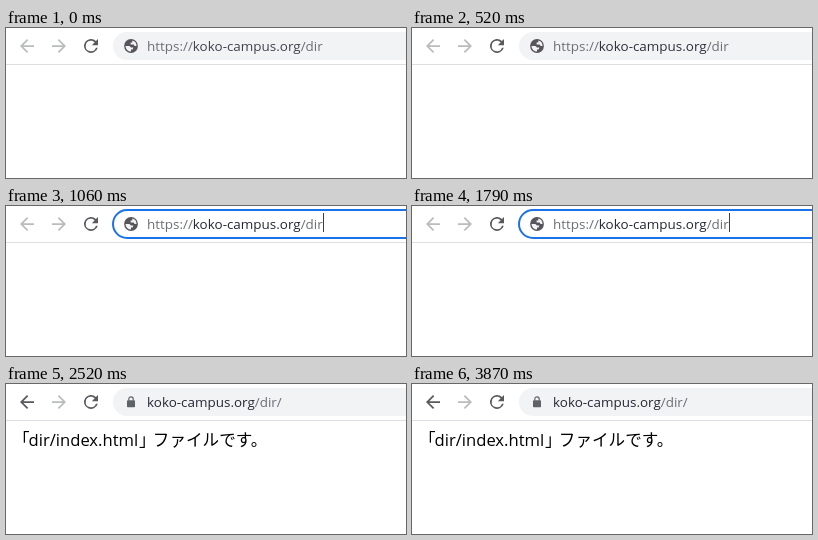
These frames come from a looping animation (400x150 px, 5460 ms). An HTML page:

```html
<!DOCTYPE html>
<html lang="ja">
<head>
<meta charset="utf-8">
<style>
html, body { margin: 0; width: 100%; height: 100%; overflow: hidden; background: #fff; }
svg { display: block; width: 400px; height: 150px; }
.url { font: 13.45px "Open Sans", "Noto Sans", sans-serif; fill: #6c7075; }
.page { font: 16.6px "Noto Sans CJK JP", "Noto Sans CJK", sans-serif; fill: #000; }
.latin { font-family: "Open Sans", "Noto Sans", sans-serif; }
</style>
</head>
<body>
<svg viewBox="0 0 400 150">
  <path d="M0 36.5H400" stroke="#dcdee1"/>
  <path id="back" transform="translate(10.5 7.5) scale(.875)"
    d="M20 11H7.83l5.59-5.59L12 4l-8 8 8 8 1.41-1.41L7.83 13H20z"/>
  <path fill="#babcbe" transform="translate(63.5 7.5) scale(-.875 .875)"
    d="M20 11H7.83l5.59-5.59L12 4l-8 8 8 8 1.41-1.41L7.83 13H20z"/>
  <g fill="#5b585e">
    <path id="reload" transform="translate(74.5 7.5) scale(.875)"
      d="M17.65 6.35A8 8 0 1 0 19.73 14h-2.08A6 6 0 1 1 12 6c1.66 0 3.14.69 4.22 1.78L13 11h7V4z"/>
    <path id="stop" d="M79.5 12.5l11 11m0-11l-11 11" stroke="#5b585e" stroke-width="1.8"/>
  </g>
  <rect id="bar" x="107" y="4" width="320" height="28" rx="14"/>
  <rect id="ring" x="107" y="4" width="320" height="28" rx="14" fill="#fff" stroke="#1a73e8" stroke-width="2"/>
  <g id="globe">
    <circle cx="125" cy="18" r="6.9" fill="#57545b"/>
    <path fill="#f1f3f4" d="M126.3 12.6A5.5 5.5 0 0 1 130.5 18H128.6L127.6 16.6H124.6V14.6H126.3z
      M119.5 18H123.4L125 19.6H127.4L126.6 21.4H125V23.5A5.5 5.5 0 0 1 119.5 18z"/>
  </g>
  <g id="lock" fill="#5f6368">
    <rect x="121" y="16.3" width="8" height="6.9" rx=".8"/>
    <path d="M122.8 16.6v-1.6a2.2 2.2 0 0 1 4.4 0v1.6" fill="none" stroke="#5f6368" stroke-width="1.2"/>
  </g>
  <text class="url" x="141" y="23"><tspan id="scheme"></tspan><tspan id="host">koko-campus.org</tspan><tspan id="path"></tspan></text>
  <path id="caret" d="M317.5 7V26" stroke="#3c4043"/>
  <text id="page" class="page" y="62"><tspan x="7">「</tspan><tspan class="latin" x="22.6">dir/index.html</tspan><tspan x="133">」</tspan><tspan x="146.8">ファイルです。</tspan></text>
</svg>
<script>
const LOOP = 5460, FOCUS = 1060, ENTER = 2320, LOADED = 2520;
const $ = id => document.getElementById(id);
const show = (id, on) => $(id).style.display = on ? "" : "none";
const setText = (id, text) => { if ($(id).textContent !== text) $(id).textContent = text; };

// Share of a stepped fade that is complete at time t
const fade = (t, start, end, steps) =>
  t < start ? 0 : Math.min(1, (Math.floor((t - start) / (end - start) * (steps - 1) + 1e-6) + 1) / steps);

const mix = (a, b, k) => `rgb(${a.map((v, i) => Math.round(v + (b[i] - v) * k))})`;

function draw(now) {
  const t = now % LOOP;
  const loaded = t >= LOADED, entered = t >= ENTER;
  const focused = t >= FOCUS && !entered;
  const loading = entered && !loaded;

  $("back").setAttribute("fill", loaded ? "#5b585e" : "#babcbe");
  show("reload", !loading);
  show("stop", loading);

  const hover = entered ? 0 : fade(t, 850, 990, 3);
  $("bar").setAttribute("fill", mix([241, 243, 244], [232, 234, 237], hover));
  show("ring", focused);
  show("caret", focused && (t < 1260 || t >= 1790));

  show("globe", !loaded);
  show("lock", loaded);
  setText("scheme", entered ? "" : "https://");
  setText("path", loaded ? "/dir/" : "/dir");
  $("host").setAttribute("fill", mix([64, 66, 76], [36, 40, 52], fade(t, 260, 590, 6)));
  show("page", loaded);
}

const start = performance.now();
(function tick() {
  draw(performance.now() - start);
  requestAnimationFrame(tick);
})();
</script>
</body>
</html>
```
